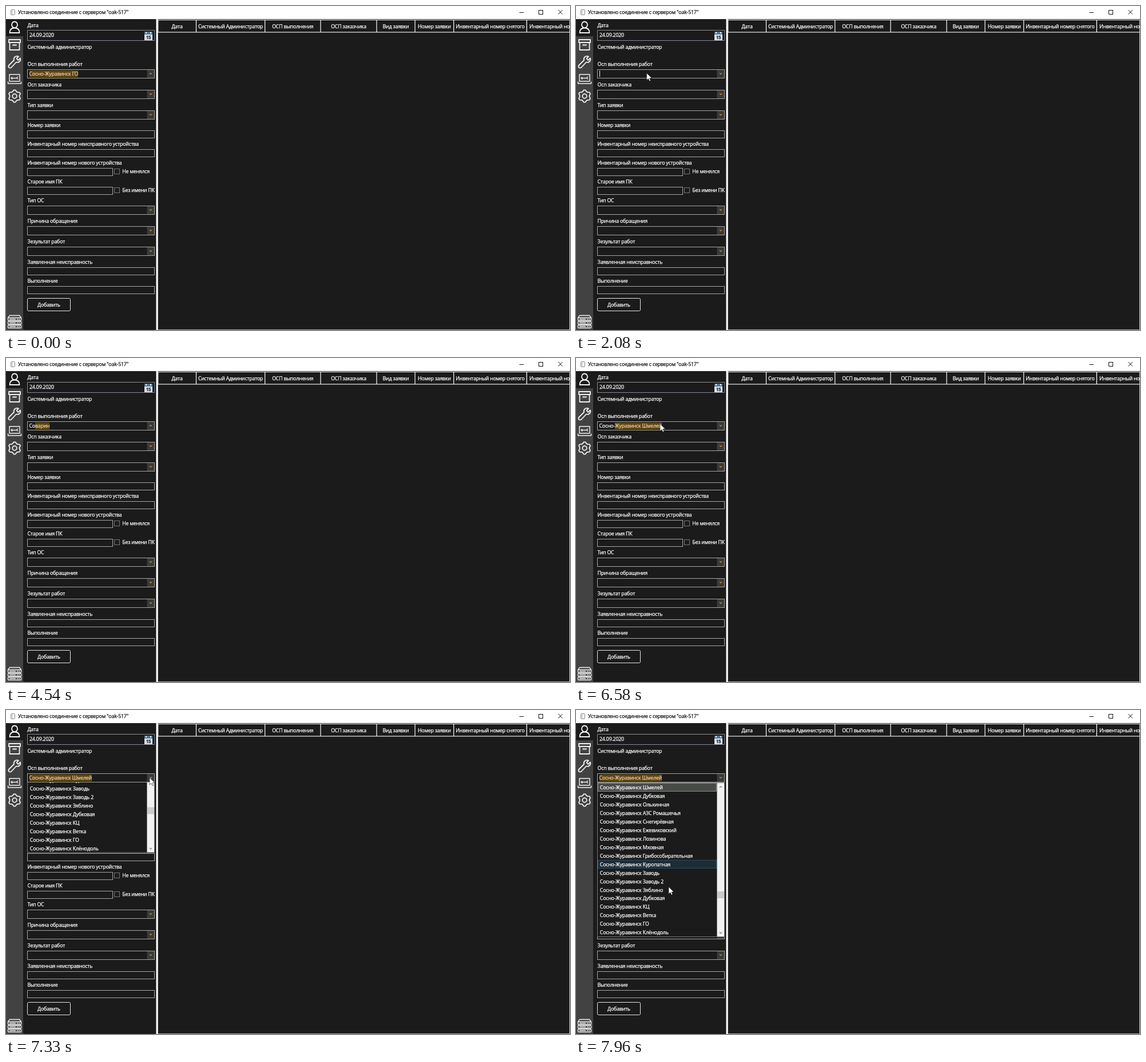
An HTML page for the animation above (8000 ms loop, 986 by 568 pixels).

```html
<!DOCTYPE html>
<html lang="ru">
<head>
<meta charset="utf-8">
<style>
html, body { margin: 0; width: 100%; height: 100%; overflow: hidden; background: #1b1b1b; }
svg { position: absolute; left: 0; top: 0; }
text, #value { font: 8.8px "Open Sans", "Noto Sans", sans-serif; letter-spacing: -0.2px; color: #fff; }
text { fill: currentColor; stroke: currentColor; stroke-width: .25; }
#value { position: absolute; left: 40.5px; top: 113px; height: 12px; line-height: 12.4px; white-space: pre; -webkit-text-stroke: .25px; }
#value span { display: inline-block; height: 12px; background: #5d450f; color: #e6d3a4; }
.icon { fill: none; stroke: #f2f2f2; stroke-width: 1.8; stroke-linejoin: round; stroke-linecap: round; }
</style>
</head>
<body>
<svg id="base" width="986" height="568"></svg>
<div id="value"></div>
<svg id="top" width="986" height="568">
  <clipPath id="below"><rect x="0" y="127" width="986" height="441"/></clipPath>
</svg>
<script>
const NS = "http://www.w3.org/2000/svg";
const base = document.getElementById("base");
const over = document.getElementById("top");
const value = document.getElementById("value");

function add(parent, tag, attrs, content) {
  const el = document.createElementNS(NS, tag);
  for (const k in attrs) el.setAttribute(k, attrs[k]);
  if (content) el.textContent = content;
  parent.appendChild(el);
  return el;
}
const rect = (p, x, y, width, height, fill, more) => add(p, "rect", { x, y, width, height, fill, ...more });
const frame = (p, x, y, w, h, stroke, fill = "none", more) =>
  rect(p, x + .5, y + .5, w - 1, h - 1, fill, { stroke, ...more });
const label = (p, x, yMid, str, more) => add(p, "text", { x, y: yMid + 3.1, ...more }, str);
const line = (p, d, stroke, width = 1) => add(p, "path", { d, stroke, fill: "none", "stroke-width": width });
const chevron = (p, x, y, color, s = 1) => line(p, `M${x - 2} ${y - s}L${x} ${y + s}L${x + 2} ${y - s}`, color, 1.1);
const show = (el, on) => el.setAttribute("visibility", on ? "visible" : "hidden");

const EDGE = "#a6a6a6", DARK = "#1b1b1b";

// title bar
rect(base, 0, 0, 986, 23, "#fff");
frame(base, 8, 6, 8, 10, "#8a8a8a", "#f2f2f2", { rx: 1 });
line(base, "M10.5 7V15", "#bbb");
label(base, 21, 11, 'Установлено соединение с сервером "oak-517"', { style: "color:#111" });
line(base, "M897.5 11.5H905", "#111");
frame(base, 931, 7, 8, 8, "#111");
line(base, "M965.5 7L973 14.5M973 7L965.5 14.5", "#111");

// side bar
rect(base, 0, 23, 30, 545, "#424242");
rect(base, 0, 23, 30, 30, DARK);
const icon = d => add(base, "path", { d, class: "icon" });
icon("M15 27.5a5 5.3 0 1 1-.01 0M6.5 47C6.5 41 10 38.5 15 38.5S23.5 41 23.5 47Z");
icon("M5 59H25V64H5ZM6.5 64V77H23.5V64M12 68.5H18");
icon("M22 88.5L18.5 92 21 95 25 91.5C26.5 96 22.5 100 18 98.5L9.5 107.5C6 110.5 2.5 106.5 5.5 103.5L14 95C12.5 90.5 17 86.5 22 88.5Z");
icon("M6 120H24V132H6ZM3.5 133V136H26.5V133").setAttribute("style", "stroke-width:1.4");
line(base, "M9.5 126.5H18M11 124.5L9 126.5 11 128.5M21 124L18.5 126 21 128.5", "#f2f2f2", 1.3);
let gear = "";
for (let i = 0; i < 24; i++) {
  const a = (i + 1.5) * Math.PI / 12, r = i % 4 < 2 ? 10.8 : 8.6;
  gear += (i ? "L" : "M") + (15 + r * Math.cos(a)).toFixed(1) + " " + (158 + r * Math.sin(a)).toFixed(1);
}
icon(gear + "Z");
add(base, "circle", { cx: 15, cy: 158, r: 3.8, class: "icon" });
icon("M3.5 546.5L6.5 542.5H23.5L26.5 546.5").setAttribute("style", "stroke-width:1.3");
for (let y = 546; y < 565; y += 6.5) {
  frame(base, 3, y, 24, 6, "#f2f2f2", "none", { rx: 1, "stroke-width": 1.3 });
  line(base, `M6 ${y + 3}H17M19 ${y + 3}h2m1 0h2`, "#f2f2f2", 1.6);
}

// form
const field = (y, h, w = 223) => frame(base, 37, y, w, h, EDGE, DARK);
function combo(y, h) {
  field(y, h);
  rect(base, 246.5, y + 1, 12.5, h - 2, "#3a3a3a");
  chevron(base, 253, y + h / 2 - .6, "#d0921f");
}
function check(y, str) {
  frame(base, 189, y, 10, 10, "#777");
  label(base, 203.3, y + 5, str);
}
[["Дата", 33.5], ["Системный администратор", 72], ["Осп выполнения работ", 101.5], ["Осп заказчика", 137.7],
 ["Тип заявки", 174], ["Номер заявки", 209], ["Инвентарный номер неисправного устройства", 242],
 ["Инвентарный номер нового устройства", 275], ["Старое имя ПК", 308], ["Тип ОС", 341], ["Причина обращения", 377],
 ["Зезультат работ", 413], ["Заявленная неисправность", 449], ["Выполнение", 482]]
  .forEach(([str, y]) => label(base, 37.5, y, str));
frame(base, 37, 42, 223, 19, "#858b95", DARK);
label(base, 41, 51.3, "24.09.2020");
rect(base, 242, 45, 14, 15, "#dfe3e6");
rect(base, 242, 45, 14, 5, "#56789a");
rect(base, 244, 46, 2, 2, "#fff");
rect(base, 252, 46, 2, 2, "#fff");
label(base, 249, 55, "15", { "text-anchor": "middle", style: "color:#283848;font-weight:700;font-size:8px" });
[111, 147, 183, 350, 386, 422].forEach(y => combo(y, 16));
[218, 251, 458, 491].forEach(y => field(y, 14));
[284, 317].forEach(y => field(y, 14, 150));
check(285, "Не менялся");
check(318, "Без имени ПК");
frame(base, 37, 512, 76, 23, "#e8e8e8", DARK, { rx: 2 });
label(base, 75, 524, "Добавить", { "text-anchor": "middle" });

// table
rect(base, 262.5, 23, 3.2, 545, "#fff");
rect(base, 265, 24, 721, 22.5, "#fff");
const cols = [265.7, 332.5, 452.7, 550, 648, 715, 782.7, 910.3];
["Дата", "Системный Администратор", "ОСП выполнения", "ОСП заказчика", "Вид заявки", "Номер заявки",
 "Инвентарный номер снятого"].forEach((str, i) => {
  rect(base, cols[i] + .6, 25, cols[i + 1] - cols[i] - 1.2, 20.4, DARK);
  label(base, (cols[i] + cols[i + 1]) / 2, 35.5, str, { "text-anchor": "middle" });
});
rect(base, 911, 25, 74, 20.4, DARK);
label(base, 915, 35.5, "Инвентарный но");
rect(base, 985, 24, 1, 544, "#d8d8d8");
rect(base, 265, 567, 721, 1, "#a8a8a8");

// moving parts
const hover = frame(over, 37, 111, 223, 16, "#c08a24");
const caret = rect(over, 41, 113, 1, 11.5, "#eee");

const city = "Сосно-Журавинск ";
const places = ["Шмелей", "Дубковая", "Ольхинная", "АЗС Ромашечья", "Снегирёвная", "Ежевиковский", "Лозинова", "Мховная",
  "Грибособирательная", "Куропатная", "Заводь", "Заводь 2", "Зяблино", "Дубковая", "КЦ", "Ветка", "ГО", "Клёнодоль"];
const PITCH = 14.95, rowY = i => 136 + i * PITCH;
const popup = add(over, "g", { "clip-path": "url(#below)" });
const list = add(popup, "g", {});
frame(list, 37, 127, 223, 271, "#777", DARK);
frame(list, 38, 128, 208, 15, "#8c8e8c", "#484a48");
const mark = frame(list, 38, 0, 208, 15, "#2a4f66", "#1e2c36");
places.forEach((p, i) => label(list, 41.8, rowY(i), city + p));
rect(list, 246.5, 128, 12.5, 269, "#f1f1f1");
rect(list, 247, 318, 12, 12, "#cbcbcb");
chevron(list, 253, 135, "#777", -1.2);
chevron(list, 253, 390.5, "#777", 1.2);

const cursor = add(over, "path", {
  d: "M0 0V12.5L2.9 9.8 4.9 14.2 6.9 13.3 5 9.1H9Z",
  fill: "#fff", stroke: "#111", "stroke-width": .6
});

// time, typed part, selected completion
const ERASE = 40, TYPE = 2480, WAKE = 6560, OPEN = 7290, SLIDE = 90;
const main = city + places[0];
const typing = [
  [0, "", city + "ГО"], [ERASE, "", ""],
  [TYPE, "В", "ерболеский"], [2860, "Ве", "рболеский"], [3180, "Ве", ""], [3300, "", ""],
  [3420, "С", "веторецк Заводной"], [3800, "С", ""], [3960, "", ""],
  [4250, "С", "оварин"], [4400, "Со", "варин"],
  ...[[4630, 3], [4790, 4], [5080, 5], [5540, 6]].map(([t, n]) => [t, main.slice(0, n), main.slice(n)]),
  [OPEN, "", main]
];
const path = [
  [80, 330, 9], [380, 262, 468], [830, 428, 246], [900, 429, 251], [1700, 203, 149], [2060, 123.5, 117.5], [TYPE, 123.5, 117.5],
  [WAKE, 147, 115.5], [6600, 147, 115.5], [7190, 251, 118.5], [7690, 251, 118.5], [7770, 234, 150], [7830, 206, 212], [7960, 162, 310]
];

const ease = k => k * k * (3 - 2 * k);

function pointer(t) {
  const i = path.findIndex(p => p[0] > t);
  if (i < 0) return path[path.length - 1].slice(1);
  if (!i) return path[0].slice(1);
  const [t0, x0, y0] = path[i - 1], [t1, x1, y1] = path[i];
  let k = (t - t0) / (t1 - t0);
  if (t < OPEN) k = ease(k);
  return [x0 + (x1 - x0) * k, y0 + (y1 - y0) * k];
}

let shown = null;
function draw(t) {
  const step = typing.filter(s => s[0] <= t).pop();
  if (step !== shown) {
    shown = step;
    value.textContent = step[1];
    if (step[2]) value.appendChild(document.createElement("span")).textContent = step[2];
  }
  const [x, y] = pointer(t);
  cursor.setAttribute("transform", `translate(${x.toFixed(2)} ${y.toFixed(2)})`);
  show(cursor, t >= path[0][0] && t < TYPE || t >= WAKE);
  show(caret, !step[1] && !step[2] && Math.floor((t - ERASE + 100) / 530) % 2 === 0);
  show(hover, t >= 6600 && t < OPEN);

  const open = t >= OPEN;
  show(list, open);
  list.setAttribute("transform", `translate(0 ${-271 * (1 - Math.min(1, Math.max(0, (t - OPEN) / SLIDE)))})`);
  const row = Math.floor((pointer(t - 60)[1] - 128.5) / PITCH);
  show(mark, open && row > 0);
  mark.setAttribute("y", rowY(row) - 7.2);
}

const start = performance.now();
function tick() {
  draw((performance.now() - start) % 8000);
  requestAnimationFrame(tick);
}
draw(0);
requestAnimationFrame(tick);
</script>
</body>
</html>
```
